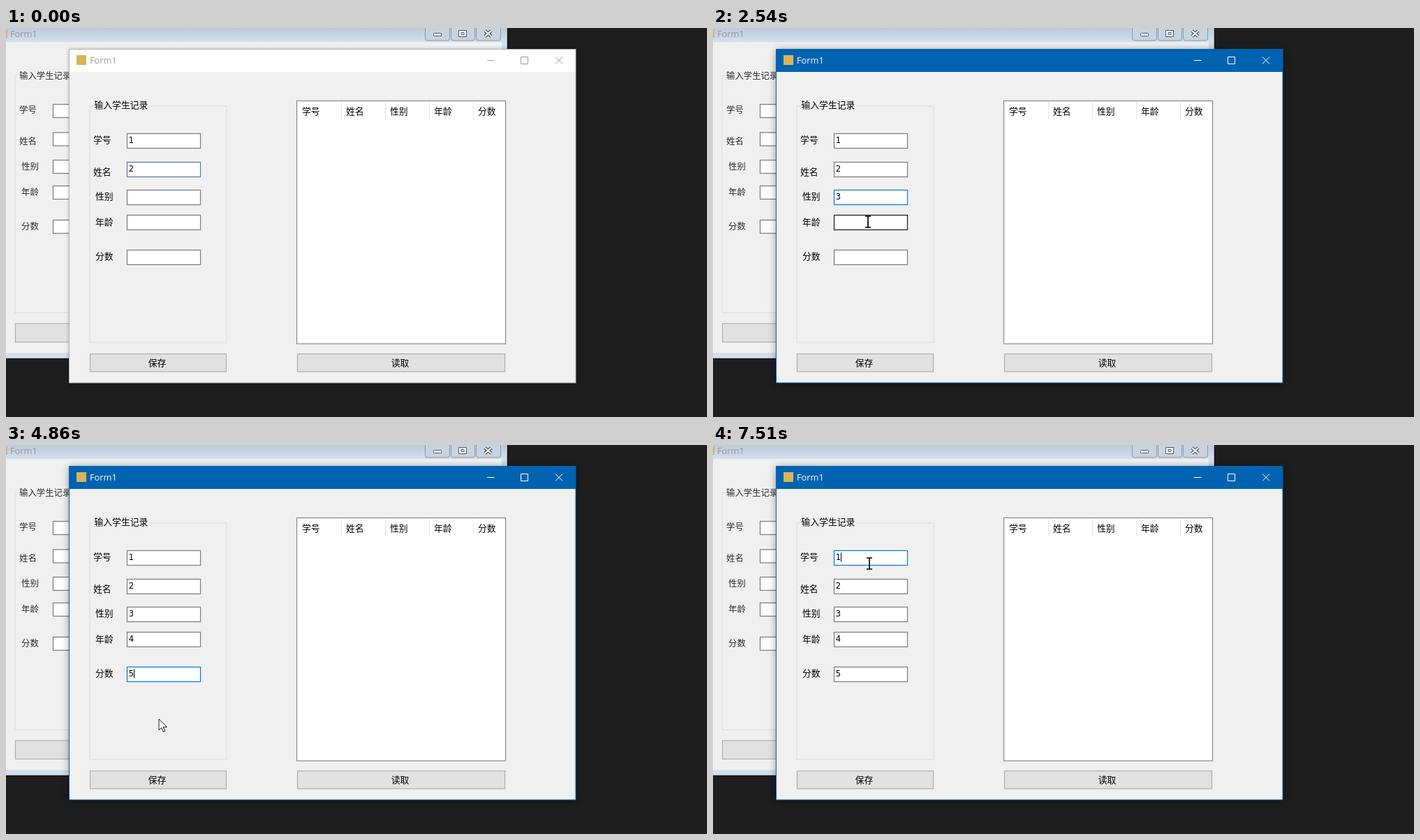
An HTML page for the animation above (8 s loop, 1004 by 558 pixels).

```html
<!DOCTYPE html>
<html lang="zh-CN">
<head>
<meta charset="utf-8">
<title>Student form</title>
<style>
  html, body { margin: 0; width: 100%; height: 100%; overflow: hidden; background: #1e1e1e; }
  svg { display: block; width: 100%; height: 100%; }
  text { font: 12.8px "Noto Sans CJK SC", "Noto Sans CJK", sans-serif; fill: #000; white-space: pre; }
  .old text { font-size: 12.4px; fill: #2c2c2c; font-weight: 300; }
  .title { font: 12.8px "Open Sans", "Noto Sans", sans-serif; }
  .old .title { font: 12.8px "Open Sans", "Noto Sans", sans-serif; fill: #8d959e; }
  .value { font: 11.5px "DejaVu Sans", sans-serif; }
  .mid { text-anchor: middle; }
  .group { fill: none; stroke: #dcdcdc; }
  .box { fill: #fff; stroke: #7a7a7a; stroke-width: 1.2; }
  .btn { fill: #e1e1e1; stroke: #adadad; stroke-width: 1.2; }
  #frame { fill: #f0f0f0; filter: drop-shadow(0 1px 3px rgba(0,0,0,.3)); }
  #bar { fill: #fff; }
  #edge { fill: none; stroke: #b4b4b4; }
  #caption { fill: #999; }
  #marks { fill: none; stroke: #999; }
  .active #frame { filter: drop-shadow(0 2px 6px rgba(0,0,0,.45)); }
  .active #bar { fill: #0063b1; }
  .active #edge { stroke: #0063b1; }
  .active #caption { fill: #fff; }
  .active #marks { stroke: #fff; }
</style>
</head>
<body>
<svg viewBox="0 0 1004 558">
  <defs>
    <linearGradient id="glass" x2="0" y2="1">
      <stop offset="0" stop-color="#bccada"/>
      <stop offset="1" stop-color="#d3dfec"/>
    </linearGradient>
  </defs>
  <rect width="1004" height="558" fill="#1e1e1e"/>

  <g class="old">
    <rect x="-5" y="-5" width="723.5" height="479.5" fill="#d3dfec" stroke="#101010" stroke-width="1.5"/>
    <rect width="717" height="20" fill="url(#glass)"/>
    <rect y="20" width="710" height="446" fill="#f0f0f0"/>
    <rect x="-11" y="2" width="13" height="12" fill="#d9b45a"/>
    <text class="title" x="6" y="13">Form1</text>
    <g fill="#c6d3e1" stroke="#8a98a8">
      <rect x="600.5" y="-5" width="35" height="23" rx="3"/>
      <rect x="637.5" y="-5" width="34" height="23" rx="3"/>
      <rect x="673.5" y="-5" width="35" height="23" rx="3"/>
    </g>
    <g fill="#fff" stroke="#4d5560">
      <rect x="612.5" y="7.5" width="11" height="4" rx="1"/>
      <path d="M648.5 3.5h11v9h-11zM652 6.5h4v3h-4z"/>
    </g>
    <path d="M686 4l9 8M695 4l-9 8" stroke="#4d5560" stroke-width="4.4"/>
    <path d="M686 4l9 8M695 4l-9 8" stroke="#fff" stroke-width="2.2"/>
    <rect class="group" x="13" y="68.5" width="200" height="340"/>
    <rect x="17" y="62" width="80" height="12" fill="#f0f0f0"/>
    <text x="19" y="72.7">输入学生记录</text>
    <g id="oldRows"></g>
    <rect class="btn" x="13.5" y="424" width="196" height="26.5"/>
  </g>

  <g id="win">
    <rect id="frame" x="91" y="30" width="725" height="479"/>
    <rect id="bar" x="91" y="30" width="725" height="33"/>
    <rect id="edge" x="90.5" y="30.5" width="725.5" height="478.5"/>
    <rect x="101" y="39" width="14" height="14" fill="#d9b45a"/>
    <text class="title" id="caption" x="120" y="51">Form1</text>
    <path id="marks" d="M689 46.5h10.5M737.5 41.5h10v10h-10zM787 41.5l10 10M797 41.5l-10 10"/>

    <rect class="group" x="120" y="112" width="196" height="339"/>
    <rect x="125" y="105" width="80" height="12" fill="#f0f0f0"/>
    <text x="126.5" y="115.3">输入学生记录</text>
    <g id="rows"></g>

    <rect x="416.5" y="104.5" width="299" height="348.5" fill="#fff" stroke="#828790" stroke-width="1.2"/>
    <g id="heads"></g>

    <rect class="btn" id="save" x="120.5" y="467.5" width="195" height="25.5"/>
    <text class="mid" x="216.5" y="485">保存</text>
    <rect class="btn" x="417.5" y="467.5" width="297" height="25.5"/>
    <text class="mid" x="564.5" y="485">读取</text>
  </g>

  <path id="caret" stroke="#000"/>
  <circle id="click" r="13" fill="#ff0" fill-opacity=".62"/>
  <path id="beam" d="M-4-8H4M-4 8H4M0-8V8" fill="none" stroke="#000"/>
  <path id="arrow" d="M0 0V16L3.7 12.6 6.3 18.5 8.8 17.4 6.2 11.7 11.5 11.5Z" fill="#fff" stroke="#000" stroke-width=".9"/>
</svg>

<script>
const LOOP = 8000;
const $ = id => document.getElementById(id);

function add(parent, tag, attrs, label) {
  const el = document.createElementNS('http://www.w3.org/2000/svg', tag);
  for (const k in attrs) el.setAttribute(k, attrs[k]);
  if (label) el.textContent = label;
  return parent.appendChild(el);
}

const names = ['学号', '姓名', '性别', '年龄', '分数'];
const tops = [151.5, 192.5, 232.5, 268.5, 318.5];
const oldTops = [109.5, 150, 189.5, 226.5, 275.5];
const labelY = [160, 206, 241, 278, 327];
const oldLabelY = [117, 162, 198, 235, 284];

const fields = names.map((name, i) => {
  const shift = i > 1 ? 3 : 0;
  add($('oldRows'), 'text', { x: 19 + shift, y: oldLabelY[i] + 4.7 }, name);
  add($('oldRows'), 'rect', { class: 'box', x: 67.5, y: oldTops[i], width: 100, height: 19 });
  add($('rows'), 'text', { x: 125 + shift, y: labelY[i] + 4.8 }, name);
  add($('heads'), 'text', { x: 424 + 63 * i, y: 123.8 }, name);
  if (i) add($('heads'), 'path', { d: `M${417.5 + 63 * i} 106V131`, stroke: '#e5e5e5' });
  return {
    box: add($('rows'), 'rect', { class: 'box', x: 173.5, y: tops[i], width: 105, height: 21 }),
    value: add($('rows'), 'text', { class: 'value', x: 175.8, y: tops[i] + 13.5 }, String(i + 1))
  };
});

// Screen refreshes: first, last, count
const runs = [
  [70, 70, 1], [300, 380, 2], [610, 1390, 11], [1470, 1620, 3], [1850, 1930, 2],
  [2080, 2540, 7], [3000, 3240, 4], [3390, 3390, 1], [3540, 4320, 11], [4400, 4630, 4],
  [4780, 5170, 6], [5320, 5870, 8], [6650, 7430, 11], [7510, 7510, 1]
];
const ticks = [0];
for (const [a, b, n] of runs)
  for (let i = 0; i < n; i++)
    ticks.push(Math.floor((a + (b - a) * i / Math.max(1, n - 1)) / 10) * 10);

// Pointer path: time, x, y
const path = [
  [300, 545, 444], [380, 442, 413], [540, 442, 413], [1390, 218, 250], [2000, 218, 250],
  [2540, 222, 278], [3470, 222, 278], [4170, 219, 325], [4700, 219, 325], [4780, 219, 345],
  [5170, 220, 491], [5250, 220, 491], [5550, 219, 484], [6640, 219, 484], [6650, 215, 408],
  [7350, 224, 170]
];
const hidden = [[-500, 300], [1850, 2080], [3390, 3540], [4630, 4780]];
const clicks = [[1470, 1620], [3000, 3150], [4400, 4550], [5630, 5780], [7350, 7510]];
const carets = [[1470, 2400], [3000, 3900], [4400, 5320], [7350, 8000]];
const typed = [-500, -500, 1850, 3390, 4630];
const SAVE = 5;
const focus = [[-500, 1], [-100, -1], [1470, 2], [3000, 3], [4400, 4], [5630, SAVE], [7350, 0]];

const within = (spans, t) => spans.some(([a, b]) => t >= a && t < b);
const focusAt = t => focus.filter(f => f[0] <= t).pop()[1];

function pointer(t) {
  const i = path.findIndex(p => p[0] > t);
  if (i < 0) return path[path.length - 1].slice(1);
  if (i === 0) return path[0].slice(1);
  const [t0, x0, y0] = path[i - 1], [t1, x1, y1] = path[i];
  const p = 1 - (1 - (t - t0) / (t1 - t0)) ** 2;
  return [x0 + (x1 - x0) * p, y0 + (y1 - y0) * p];
}

function hoverAt(t) {
  if (t < 300) return -1;
  const [x, y] = pointer(t);
  if (x > 120 && x < 316 && y > 467 && y < 493) return SAVE;
  return x < 174 || x > 279 ? -1 : tops.findIndex(top => y >= top && y <= top + 21);
}

// Borders fade, so average the recent states
function borderColor(i, t) {
  const sum = [0, 0, 0], back = [0, 60, 120];
  for (const d of back) {
    const c = focusAt(t - d) === i ? [0, 120, 215] : hoverAt(t - d) === i ? [23, 23, 23] : [122, 122, 122];
    c.forEach((v, k) => sum[k] += v / back.length);
  }
  return `rgb(${sum.map(Math.round)})`;
}

const show = (el, on) => el.setAttribute('visibility', on ? 'visible' : 'hidden');

function drawSave(t, hover, focused) {
  const pressed = t >= 5630 && t < 5780;
  $('save').style.fill = pressed ? '#cce4f7' : hover ? '#e5f1fb' : '#e1e1e1';
  $('save').style.stroke = pressed ? '#005499' : hover || focused ? '#0078d7' : '#adadad';
  $('save').style.strokeWidth = focused && !hover ? 2 : 1.2;
}

function draw(now) {
  const time = now % LOOP;
  const t = ticks.filter(v => v <= time).pop();
  const [x, y] = pointer(t), hover = hoverAt(t), focused = focusAt(t);
  const clicking = within(clicks, t), visible = !within(hidden, t);
  const onField = hover >= 0 && hover < SAVE;

  $('win').classList.toggle('active', t >= 1470);
  fields.forEach((f, i) => {
    f.box.style.stroke = borderColor(i, t);
    show(f.value, t >= typed[i]);
  });
  drawSave(t, hover === SAVE, focused === SAVE);

  const inField = focused >= 0 && focused < SAVE;
  show($('caret'), inField && within(carets, t));
  if (inField) {
    const cx = t >= typed[focused] ? 183.5 : 177.5;
    $('caret').setAttribute('d', `M${cx} ${tops[focused] + 3}v13`);
  }

  const at = `translate(${Math.round(x)} ${Math.round(y)})`;
  for (const id of ['beam', 'arrow', 'click']) $(id).setAttribute('transform', at);
  $('beam').setAttribute('stroke-width', clicking ? 1.1 : 1.7);
  show($('beam'), visible && onField);
  show($('arrow'), visible && !onField);
  show($('click'), clicking);
}

let start;
function loop(now) {
  start ??= now;
  draw(Math.max(0, now - start));
  requestAnimationFrame(loop);
}
draw(0);
requestAnimationFrame(loop);
</script>
</body>
</html>
```
